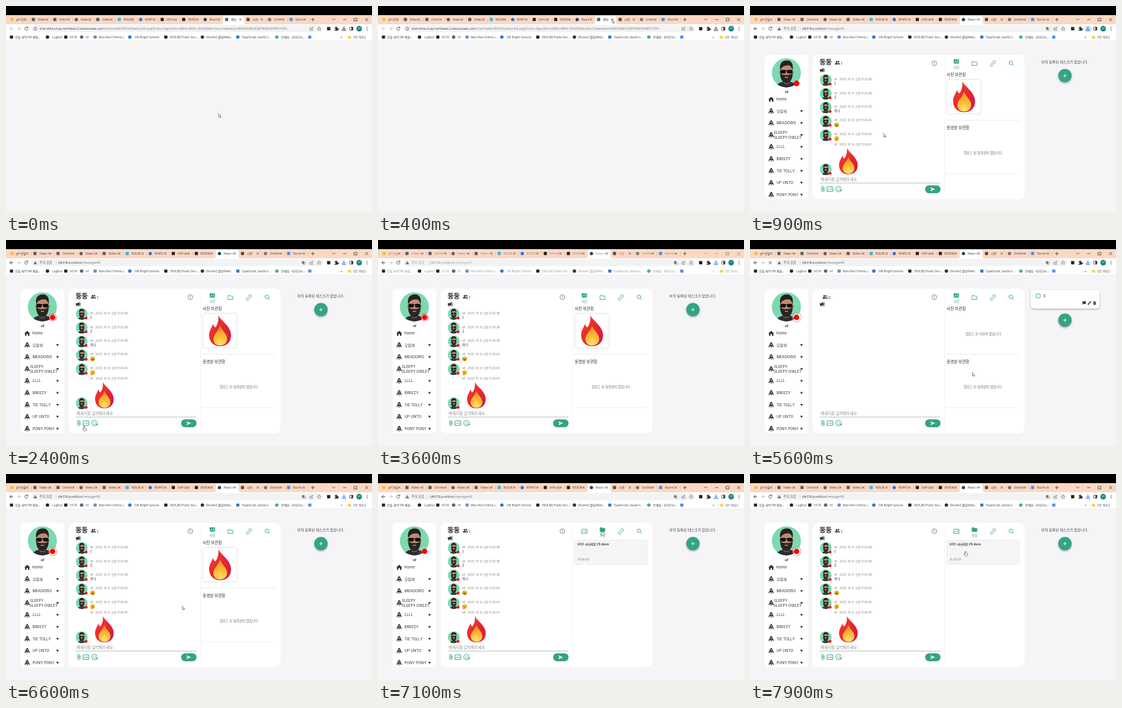
An HTML page for the animation above (8 s loop, 600x338 px).

```html
<!DOCTYPE html>
<html lang="ko">
<head>
<meta charset="utf-8">
<title>Chat demo</title>
<style>
html, body { margin: 0; width: 100%; height: 100%; overflow: hidden; background: #000; }
svg { display: block; width: 600px; height: 338px; }
text { font-family: Inter, 'Noto Sans CJK KR', 'Noto Sans CJK', sans-serif; white-space: pre; }
.ui text { font-family: 'Open Sans', 'Noto Sans CJK KR', 'Noto Sans CJK', sans-serif; }
.blur text, .blur .win { opacity: .55; }
</style>
</head>
<body>
<svg id="stage" viewBox="0 0 600 338"></svg>
<script>
const GREEN = '#35a383', DARK = '#3c4043', INK = '#333';
const stage = document.getElementById('stage');

// Text is placed by its left (or anchored) x and its vertical middle.
const text = (x, y, s, size, fill = INK, extra = '') =>
  `<text x="${x}" y="${y + size * .36}" font-size="${size}" fill="${fill}" ${extra}>${s}</text>`;
const mid = 'text-anchor="middle"', bold = 'font-weight="700"', semi = 'font-weight="500"';
const rect = (x, y, w, h, fill, r = 0, extra = '') =>
  `<rect x="${x}" y="${y}" width="${w}" height="${h}" rx="${r}" fill="${fill}" ${extra}/>`;
const dot = (x, y, r, fill, extra = '') => `<circle cx="${x}" cy="${y}" r="${r}" fill="${fill}" ${extra}/>`;
const line = (d, color, w = .8, extra = '') =>
  `<path d="${d}" fill="none" stroke="${color}" stroke-width="${w}" stroke-linecap="round" stroke-linejoin="round" ${extra}/>`;
const shape = (d, fill, extra = '') => `<path d="${d}" fill="${fill}" ${extra}/>`;
const at = (x, y, body, scale = 1) => `<g transform="translate(${x} ${y}) scale(${scale})">${body}</g>`;
const group = (id, body, extra = '') => `<g id="${id}" ${extra}>${body}</g>`;

const defs = `<defs>
  <linearGradient id="flame" x1="0" y1="0" x2="1" y2="1">
    <stop offset="0" stop-color="#f2452f"/><stop offset=".55" stop-color="#e6262f"/><stop offset="1" stop-color="#c9185a"/>
  </linearGradient>
  <linearGradient id="core" x1="0" y1="0" x2="0" y2="1">
    <stop offset="0" stop-color="#f58a2e"/><stop offset=".6" stop-color="#fbc02f"/><stop offset="1" stop-color="#fbd04c"/>
  </linearGradient>
  <clipPath id="round"><circle r="24"/></clipPath>
  <clipPath id="address"><rect x="54" y="30" width="438" height="14"/></clipPath>
  <clipPath id="side"><rect x="24" y="80" width="71.5" height="237" rx="7"/></clipPath>
  <filter id="soft" x="-30%" y="-30%" width="160%" height="180%">
    <feDropShadow dx="0" dy="1.5" stdDeviation="1.6" flood-opacity=".32"/>
  </filter>
</defs>`;

// ---------- browser window ----------
const tabNames = ['gif 만들기', 'Video to', 'Online', 'Video to', 'Video to', 'NOLBI', 'K04P31', 'k04-lab',
  'README', 'React App', '채팅', '시연', 'Untitled', 'Nurim'];
const tabColors = ['#f3c12d', '#56606b', '#56606b', '#56606b', '#56606b', '#39b5e6', '#2476e0', '#222',
  '#222', '#27485a', '#5f6368', '#5b4a3d', '#777', '#4a90e2'];

function tabs(id, gap, active, skip) {
  let out = '', i = 0;
  tabNames.forEach((name, n) => {
    if (n === skip) return;
    const x = 9.7 + gap * i++;
    if (n === active)
      out += shape(`M${x - 8} 30Q${x - 6} 29 ${x - 6} 27V19Q${x - 6} 16.3 ${x - 3.5} 16.3H${x + gap - 9}
        Q${x + gap - 6.5} 16.3 ${x + gap - 6.5} 19V27Q${x + gap - 6.5} 29 ${x + gap - 4} 30Z`, '#fff');
    else if (n !== active - 1 && n + 1 !== active)
      out += rect(x + gap - 6, 19.5, .5, 6, '#c7a997');
    out += n % 3 ? rect(x - 2.6, 19.6, 5.2, 5.2, tabColors[n], .8) : dot(x, 22.2, 2.7, tabColors[n]);
    out += `<svg x="${x + 7}" y="16" width="${gap - 22}" height="13">${text(0, 6.3, name, 5, DARK)}</svg>`;
    out += at(x + gap - 12.8, 22.2, line('M-1.5-1.5L1.5 1.5M1.5-1.5L-1.5 1.5', '#333', .7));
  });
  return group(id, out);
}

const bookmarks = [
  [9, 15, '#222', '한들 새싹 SW 배움...'], [68, 76, '#222', 'LogNut'], [98, 105, '#222', 'K318'],
  [124, 130.5, '#5f6368', 'rif'], [146, 152, '#6b8fc4', 'MaruTest Online J...'],
  [203, 211, '#2577d8', 'SW Bright Schools'], [262, 269, '#222', '[NOLBI] Public Doc...'],
  [322, 328, '#333', '[Flutter] 웹뷰(Web...'], [380, 386.5, '#3178c6', 'TypeScript: JavaScri...'],
  [444, 451, '#37b58c', '온배움 - 라이프타...'], [498, 505, '#4a8df0', '']
];

const download = color => line('M0-3.2V1M-1.9-.7L0 1.2L1.9-.7M-2.8 1.3V3H2.8V1.3', color, 1);

const chrome = group('chrome',
  rect(0, 15, 600, 15, '#fcd8c4') + rect(0, 30, 600, 28, '#fff') +
  tabs('tabsA', 35.2, 10) + tabs('tabsB', 37.8, 9, 10) +
  line('M503 19.8V24.8M500.5 22.3H505.5', '#333', .8) +
  group('win', line('M535.2 21L537.3 23.2L539.4 21M553 22.3H557.5M571 20.2H575.3V24.5H571ZM589 20.2L593.4 24.6M593.4 20.2L589 24.6', '#222', .7), 'class="win"') +
  rect(42, 31.3, 478, 11.8, '#f1f3f4', 5.9) +
  group('backOff', line('M11.5 37.2H6.5M8.8 34.8L6.4 37.2L8.8 39.6', '#b5b8bb', .9)) +
  group('backOn', line('M11.5 37.2H6.5M8.8 34.8L6.4 37.2L8.8 39.6', '#333', .9)) +
  line('M18.5 37.2H23.5M21.2 34.8L23.6 37.2L21.2 39.6', '#b5b8bb', .9) +
  group('reload', line('M35.2 35.3A2.6 2.6 0 1 0 35.8 38M35.8 34.3V36H34', '#444', .9)) +
  group('stop', line('M31 35.1L35.3 39.4M35.3 35.1L31 39.4', '#444', .9)) +
  group('urlA',
    dot(48, 37.2, 2.6, 'none', 'stroke="#5f6368" stroke-width=".7"') + line('M48 37V38.5M48 35.8V35.9', '#5f6368', .7) +
    `<g clip-path="url(#address)">` + text(55, 37.2,
    'chat-shire.s3.ap-northeast-2.amazonaws.com<tspan fill="#777">/chat/media/40/3d-fluency-fire.png?X-Amz-Algorithm=AWS4-HMAC-SHA256&amp;X-Amz-Credential=AKIAEXAMPLEQRTWM25HNPO72F4...</tspan>',
    4.95, '#333') + '</g>') +
  group('urlB', shape('M48 34.4L51 39.7H45Z', '#5f6368') + rect(47.7, 36.2, .6, 1.8, '#fff') +
    text(55, 37.2, '주의 요함', 5.2, '#5f6368') + rect(82, 34.8, .5, 5, '#c4c7ca') +
    text(86, 37.2, 'j4k318.p.nolbi.io<tspan fill="#777">/message/40</tspan>', 5, '#333') +
    rect(485.3, 34.8, 3.6, 4.2, '#777', .5) + rect(487, 36, 3.6, 4, 'none', .5, 'stroke="#666" stroke-width=".6"')) +
  line('M499.5 36.2H498.3V39.8H503V38.6M499.8 38C500 36.4 501 35.8 503 35.8M501.7 34.4L503.2 35.8L501.7 37.2', '#5f6368', .7) +
  line('M513.3 34.2L514.2 36.3L516.4 36.5L514.7 38L515.3 40.1L513.3 39L511.3 40.1L511.9 38L510.2 36.5L512.4 36.3Z', '#5f6368', .6) +
  rect(526.3, 34.5, 5.4, 5.4, '#222', .8) +
  shape('M538.7 35.5H540.2A1.2 1.2 0 1 1 542.3 35.5H544V37.2A1.2 1.2 0 1 1 544 39.2V40.4H538.7V38.8A1.1 1.1 0 1 0 538.7 37Z', '#333') +
  group('halo', dot(554, 37.2, 6, '#dfe5ee')) +
  group('dlA', at(554, 37.2, download('#333'))) + group('dlB', at(554, 37.2, download('#1a73e8'))) +
  rect(563.6, 34.7, 5.2, 5, 'none', .5, 'stroke="#333" stroke-width=".8"') + rect(566.2, 34.7, 2.6, 5, '#333') +
  dot(579, 37.2, 4.6, '#14857b') + text(579, 37.2, '새싹', 3, '#fff', mid) +
  [34.9, 37.2, 39.5].map(y => dot(592, y, .65, '#333')).join('') +
  bookmarks.map(([x, tx, c, s], i) =>
    (i % 2 ? dot(x, 51, 2.8, c) : rect(x - 2.6, 48.4, 5.2, 5.2, c, .8)) + text(tx, 51, s, 4.85, DARK)).join('') +
  text(548.5, 50.6, '»', 5.5, '#333') + rect(557, 48.5, .5, 5, '#ccc') +
  shape('M560.5 48.7H562.6L563.3 49.5H566V53.6H560.5Z', '#f6cf5f') + text(569, 51, '모든 북마크', 4.4, DARK) +
  rect(0, 57.3, 600, .7, '#e3e4e6'), 'class="ui"');

// ---------- page pieces ----------
const flame = (x, y, scale) => at(x, y,
  shape('M15 0C18 8 36 18 36 33C36 45 28 51 18 51C8 51 0 44 0 33C0 25 4 21 6.5 14.5C7.5 18 8.5 19.5 10.5 20C14 15 16 8 15 0Z', 'url(#flame)') +
  shape('M18 17C20 25 29.5 30 29.5 39C29.5 46 24 50 18 50C12 50 7 46 7 39.5C7 31 16 26 18 17Z', 'url(#core)') +
  shape('M18 35C19 39 23 41 23 45C23 48 21 49.6 18 49.6C15 49.6 13 48 13 45C13 41 17 39 18 35Z', '#fde08a', 'opacity=".55"'), scale);

const face = (x, y, r) => at(x, y, `<g clip-path="url(#round)">` + dot(0, 0, 24, '#7dd9b1') +
  `<ellipse cx="0" cy="25" rx="18" ry="11" fill="#2c2d33"/>` +
  rect(-4.5, 6, 9, 12, '#9c6f57', 3) + `<ellipse cx="0" cy="-3" rx="9.8" ry="14" fill="#c08c70"/>` +
  dot(-10, -1, 2.2, '#b27e64') + dot(10, -1, 2.2, '#b27e64') +
  shape('M-10-4C-12-13-9-20 0-20.5C9-21 12-13 10-4C9-9 7-12 3-12.5C-2-12-7-12-10-4Z', '#26211f') +
  shape('M-10.2 0C-7.5 3-5 3.6 0 3.6S7.5 3 10.2 0C10.8 9 6 17 0 17S-10.8 9-10.2 0Z', '#2b2422') +
  rect(-3, 6.2, 6, 2, '#b0705f', 1) +
  rect(-10, -5, 9, 6, '#111', 2.5) + rect(1, -5, 9, 6, '#111', 2.5) + rect(-2, -4.2, 4, 1.2, '#111') + '</g>', r / 24);

const people = shape('M-4 3V1.5Q-4 .2-1.3 .2T1.4 1.5V3ZM2 3V1.6Q2 .7 1.4 .2Q4 .3 4 1.6V3Z', '#444') + dot(-1.3, -1.6, 1.5, '#444') + dot(1.8, -1.6, 1.3, '#444');
const rocket = shape('M0-5.2C2.6-3.6 3.1-.8 2.5 2H-2.5C-3.1-.8-2.6-3.6 0-5.2ZM-3-.2L-4.3 2.2V4L-2.2 2.6ZM3-.2L4.3 2.2V4L2.2 2.6ZM-1.2 2.8H1.2L0 5.2Z', '#333') + dot(0, -1.4, 1, '#fff');
const picture = on => on
  ? rect(-4.4, -3.6, 8.8, 7.2, GREEN, .8) + line('M-4 2L-1.2-.6L.8 1.3L2.2 0L4 1.8', '#fff', .8) + dot(2, -1.7, .8, '#fff')
  : rect(-4.4, -3.6, 8.8, 7.2, 'none', .6, `stroke="${GREEN}" stroke-width=".9"`) + line('M-4 2L-1.2-.6L.8 1.3L2.2 0L4 1.8', GREEN, .8) + dot(2, -1.7, .7, GREEN);
const folder = on => `<path d="M-4-3.2H-1L0-2.1H4V3.3H-4Z" fill="${on ? GREEN : 'none'}" stroke="${GREEN}" stroke-width=".9" stroke-linejoin="round"/>`;
const plus = y => dot(516.3, y, 11, GREEN, 'filter="url(#soft)"') + line(`M513.8 ${y}H518.8M516.3 ${y - 2.5}V${y + 2.5}`, '#fff', .9);

const rooms = ['모람새', 'MEADOWS', '', 'LLLL', 'BREEZY', 'TIE TOLLY', 'UP UNTO', 'PONY PONY'];
const sidebar = rect(24, 80, 71.5, 237, '#fff', 7) + face(59.7, 109.7, 24) +
  `<circle id="ring" cx="76.4" cy="127" fill="#fff" stroke="#f00" stroke-width="1"/>` + dot(76.4, 127, 4.4, '#f00') +
  text(60, 141, 'rif', 5.2, '#222', mid + bold) +
  `<g clip-path="url(#side)">` +
  shape('M30 153.3L34.8 149L39.6 153.3H38.4V157.3H36V154.3H33.6V157.3H31.2V153.3Z', '#333') +
  text(43, 153.2, 'Home', 6.1) +
  rooms.map((name, i) => {
    const y = 172.5 + i * 19.6;
    return at(34.7, y, rocket, .95) + shape(`M82.2 ${y - 1.5}H86.8L84.5 ${y + 2}Z`, '#333') + (name
      ? text(43.5, y, name, 6)
      : text(39, y - 3.4, 'SLEEPY', 6) + text(39, y + 3.7, 'SLEEPY OWLET', 6));
  }).join('') + '</g>';

const emoji = (x, y, extra) => at(x, y, dot(0, 0, 4, '#f8c535') + extra);
const laugh = line('M-2.4-1.2L-1-.8M2.4-1.2L1-.8', '#5a3515', .7) + shape('M-2 .5H2Q1.6 2.8 0 2.8T-2 .5Z', '#6b3a1c') + dot(-3, 1, 1, '#54b4ea') + dot(3, 1, 1, '#54b4ea');
const ponder = dot(-1.3, -1, .6, '#5a3515') + dot(1.5, -1, .6, '#5a3515') + line('M-1.2 1.2L1.4 .8', '#5a3515', .7) + shape('M-3 3.6Q-2.6 1.6-.6 2.4Q1.2 2.4 .4 3.6Q-1.6 4.6-3 3.6Z', '#e08a25');
const nameY = [120.7, 143.2, 165.7, 187.8, 210.3, 227.8], faceY = [121.3, 143.8, 166.3, 188.8, 211.8, 267.8];
const seconds = [38, 38, 39, 42, 43, 47];

const chat = group('chat',
  text(114, 92.5, '둥둥', 11, '#222', bold) + at(143.3, 93, people) + text(149, 94.3, '1', 6.3, '#444') +
  nameY.map((y, i) => face(124.2, faceY[i], 9.8) + dot(131.4, faceY[i] + 6.8, 2.3, '#f00') +
    text(138, y, 'rif', 4.7, '#666') + text(146.8, y, `2023. 10. 6. 오전 11:20:${seconds[i]}`, 4.5, '#777')).join('') +
  text(138, 127.5, '1', 5.6) + text(138, 150, '2', 5.6) + text(138, 172.4, '하나', 5.4) +
  emoji(142, 195, laugh) + emoji(142, 217.5, ponder) + flame(146, 233, .85));

const chatEmpty = group('chatEmpty', at(123, 93.4, people) + text(128, 94.6, '0', 6.3, '#444'));

const mainCard = rect(103, 80, 347, 237, '#fff', 9) + rect(318.7, 85, .6, 224, '#e6e6e6') +
  shape('M114.5 103.8H116.8L120.2 102V108.6L116.8 107V109H115.5V106.8H114.5ZM120.9 102.2H121.9V108.4H120.9Z', '#333') +
  dot(302.2, 93.8, 3.9, 'none', 'stroke="#555" stroke-width=".7"') + text(302.2, 93.9, '?', 5.4, '#555', mid) +
  rect(114, 290, 198, .8, '#9fb3ab') + text(116, 284.3, '메세지를 입력해주세요', 6.25, '#8c8c8c') +
  line('M121.8 298V302.5A2.3 2.3 0 0 1 117.2 302.5V297.2A1.6 1.6 0 0 1 120.4 297.2V302A.8 .8 0 0 1 118.8 302V298', GREEN, .8) +
  at(131, 300.5, picture(false), 1.08) +
  dot(145, 300.3, 4.6, 'none', `stroke="${GREEN}" stroke-width=".9"`) + dot(143.4, 299, .8, GREEN) + dot(146.6, 299, .8, GREEN) +
  line('M142.7 301.6Q145 304 147.3 301.6', GREEN, .8) + dot(149, 302.8, 1.3, GREEN) +
  rect(287, 294.2, 25.4, 13, GREEN, 6.5) + shape('M296 297.6L303.4 300.7L296 303.8L296.8 301.2L300 300.7L296.8 300.2Z', '#fff') +
  line('M397.2 95.4L399.4 93.2M397.4 92L399 90.4A1.9 1.9 0 0 1 401.8 93.2L400.2 94.8M399.2 96.6L397.6 98.2A1.9 1.9 0 0 1 394.8 95.4L396.4 93.8', GREEN, .95) +
  dot(427.6, 93.2, 2.9, 'none', `stroke="${GREEN}" stroke-width=".95"`) + line('M429.8 95.4L432 97.6', GREEN, 1);

const media = group('media', at(338.3, 91, picture(true)) + text(338.3, 101, '사진', 5.2, GREEN, mid + semi) + at(368, 94.2, folder(false)) +
  text(322.5, 112.3, '사진 보관함', 6.4, '#222', semi) + text(322.5, 199.4, '동영상 보관함', 6.4, '#222', semi) +
  rect(322, 187.4, 120, .6, '#e2e2e2') + rect(322, 274.8, 120, .6, '#e2e2e2') +
  text(382.5, 241, '업로드 된 동영상이 없습니다.', 5.3, '#666', mid));
const photo = group('photo', rect(322.7, 120.3, 56.2, 56.8, '#fff', 4, 'stroke="#d5d5d5" stroke-width=".7"') + flame(333, 123.2, 1));
const noPhoto = group('noPhoto', text(383, 154, '업로드 된 사진이 없습니다.', 5.3, '#666', mid));
const files = group('files', at(338.3, 94.2, picture(false)) + at(368, 91.2, folder(true)) + text(368, 101, '파일', 5.2, GREEN, mid + semi) +
  rect(322.3, 108.3, 119.5, 40, '#f5f5f5', 4, 'stroke="#e4e4e4" stroke-width=".6"') +
  text(327, 115.6, 'UCC 시나리오 (1).docx', 5, '#333', bold) + text(327, 140.8, '16.96 KB', 4.7, '#888'));

const noTask = group('noTask', text(516, 92, '아직 등록된 태스크가 없습니다.', 5.9, '#444', mid + semi) + plus(114.3));
const task = group('task', rect(460.5, 82, 112.5, 30.2, '#fff', 5, 'filter="url(#soft)"') +
  rect(469.3, 88.5, 6.4, 6.4, 'none', .6, `stroke="${GREEN}" stroke-width=".9"`) + text(480.7, 92, '0', 5.8) +
  shape('M544.7 102.6A3.2 2.4 0 1 1 547 105L545 106.2L545.4 104.4Z', '#444') +
  line('M554.6 105.4L558.6 101.2', '#444', 1.7) + shape('M553.5 106.6L554 104.2L555.8 106Z', '#444') +
  shape('M562.4 101H567.4V101.8H562.4ZM564 100.2H565.8V101H564ZM562.8 102.3H567L566.6 106.4H563.2Z', '#444') + plus(131.5));

const arrow = group('arrow', shape('M0 0V6L1.4 4.8L2.3 6.8L3.2 6.4L2.3 4.5H4Z', '#fff', 'stroke="#222" stroke-width=".5"'));
const hand = group('hand', shape('M-1 .3Q-1-.6-.3-.6T.4 .3V2.4L3 3Q3.5 3.2 3.4 4L3 6Q2.8 7.2 2 7.2H-.3Q-1 7.2-1.5 6.4L-2.8 4.4Q-2.8 3.6-2 3.8L-1 4.6Z', '#fff', 'stroke="#222" stroke-width=".55"'));

stage.innerHTML = defs + rect(0, 15, 600, 323, '#f5f5f7') + chrome +
  group('app', sidebar + mainCard + chat + chatEmpty + media + photo + noPhoto + files + noTask + task) +
  group('cursor', arrow + hand);

// ---------- timeline ----------
const LOOP = 8000, STEP = 100;
const path = [[0, 348.7, 176.6], [100, 348.7, 176.6], [400, 384, 22], [500, 384, 22], [900, 219, 209], [1100, 219, 209],
  [1800, 131, 303], [2400, 128.5, 306], [2800, 128.5, 306], [4700, 430, 205], [5000, 391, 217.5], [5300, 391, 217.5],
  [6200, 289, 216.5], [6600, 289, 216.5], [7000, 368, 93], [7300, 368, 95], [7700, 353.5, 127.5], [8000, 353.5, 127.5]];
const el = id => document.getElementById(id);
const show = (id, on) => { el(id).style.display = on ? '' : 'none'; };

function pointer(t) {
  const i = path.findIndex(k => k[0] > t), [t0, x0, y0] = path[i - 1], [t1, x1, y1] = path[i];
  const p = (t - t0) / (t1 - t0), e = p * p * (3 - 2 * p);
  return [x0 + (x1 - x0) * e, y0 + (y1 - y0) * e];
}

function draw(t) {
  const app = t >= 500, loading = t >= 4800 && t < 5700, fileTab = t >= 7000;
  const away = t >= 2900 && t < 4700;   // a system dialog holds the focus
  const pointing = (t >= 1700 && t < 2900) || t >= 6900;
  const states = {
    app, tabsA: !app, tabsB: app, urlA: !app, urlB: app, backOff: !app, backOn: app, dlA: !app, dlB: app,
    halo: app && t < 1500, reload: !loading, stop: loading,
    chat: !loading, chatEmpty: loading, media: !fileTab, photo: !loading && !fileTab, noPhoto: loading,
    files: fileTab, noTask: !loading, task: loading,
    cursor: !away, arrow: !pointing, hand: pointing
  };
  for (const id in states) show(id, states[id]);
  el('chrome').setAttribute('class', away ? 'ui blur' : 'ui');
  el('cursor').setAttribute('transform', `translate(${pointer(t)})`);

  // The status ring grows from the dot and fades.
  const p = ((t - (t < 4800 ? 780 : 4850) + 1200) % 1200) / 1200;
  el('ring').setAttribute('r', 4.4 * (.8 + 1.6 * p));
  el('ring').setAttribute('opacity', 1 - p);
}

function tick(now) {
  draw(Math.floor(now % LOOP / STEP) * STEP);
  requestAnimationFrame(tick);
}
draw(0);
requestAnimationFrame(tick);
</script>
</body>
</html>
```
